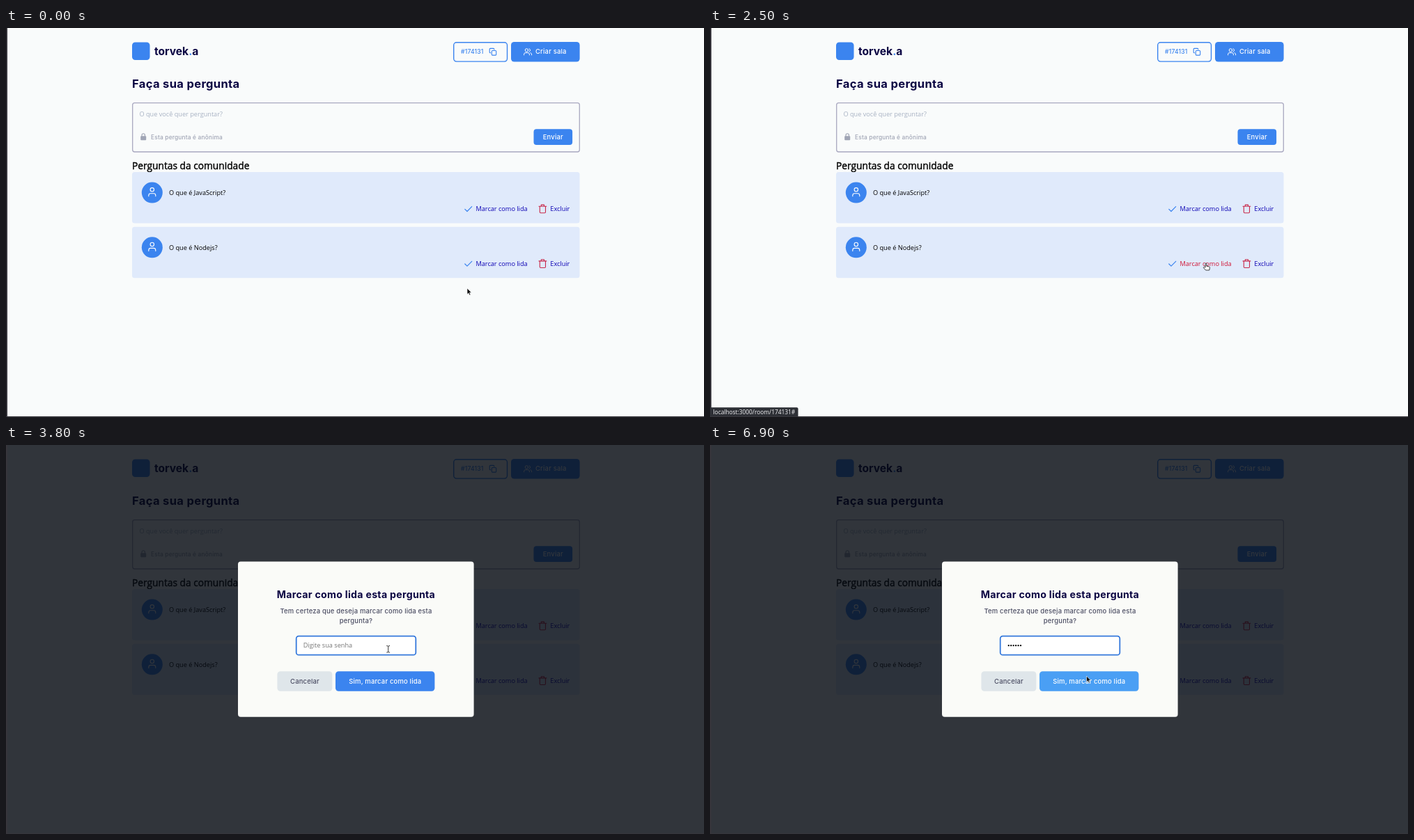
Recreate the animation shown at these times as an HTML page. Size 1002 px wide and 559 px high, loop 8 s.

```html
<!DOCTYPE html>
<html lang="pt-BR">
<head>
<meta charset="utf-8">
<title>Perguntas</title>
<style>
  html, body { margin: 0; width: 100%; height: 100%; overflow: hidden; background: #f9fbfb; }
  svg { display: block; width: 1002px; height: 559px; }
  text { font: 9.16px "Open Sans", "Noto Sans", sans-serif; }
  .ui { font: 500 9.45px Inter, sans-serif; letter-spacing: .02em; }
  .title { font: 700 16.55px Inter, sans-serif; letter-spacing: .02em; fill: #0b0543; }
  .mid { text-anchor: middle; }
  .blue { fill: #3b84ef; }
  .line { fill: none; stroke-linecap: round; stroke-linejoin: round; }
</style>
</head>
<body>
<svg viewBox="0 0 1002 559">
  <defs>
    <g id="card">
      <rect x="181" y="207" width="642.5" height="73.5" rx="3.5" fill="#e0eafb"/>
      <circle class="blue" cx="209.8" cy="236.6" r="15"/>
      <g class="line" stroke="#fff" stroke-width="1.1">
        <circle cx="209.8" cy="232.3" r="2.7"/>
        <path d="M204.8 241.7v-1.2a2.8 2.8 0 0 1 2.8-2.8h4.4a2.8 2.8 0 0 1 2.8 2.8v1.2"/>
      </g>
      <path class="line" stroke="#3b84ef" stroke-width="1.2" d="M658.8 260.3l3.2 3.2 6.7-6.9"/>
      <text x="674.5" y="263.3" fill="currentColor">Marcar como lida</text>
      <path class="line" stroke="#c8284a" stroke-width="1.1"
        d="M765 256.2h10.8M768.3 256v-1.9h4.2v1.9M766.3 256.4v8.2a1.2 1.2 0 0 0 1.2 1.2h5.8a1.2 1.2 0 0 0 1.2-1.2v-8.2"/>
      <text x="781.3" y="263.3" fill="#0b00b4">Excluir</text>
    </g>
  </defs>

  <rect width="1002" height="559" fill="#f9fbfb"/>
  <rect class="blue" x="181" y="20.5" width="25.5" height="25.5" rx="4.5"/>
  <text class="title" x="213" y="38.6" style="font-size:15.6px;letter-spacing:0">torvek<tspan class="blue">.</tspan>a</text>

  <rect x="642.7" y="20.7" width="76.8" height="27.4" rx="4" fill="none" stroke="#3b84ef" stroke-width="1.4"/>
  <text class="ui blue" x="653" y="37.3" style="font-size:8.6px">#174131</text>
  <g class="line" stroke="#3b84ef" stroke-width="1.1">
    <rect x="697.3" y="32.5" width="6.4" height="6.6" rx="1"/>
    <path d="M695.8 35.8h-.6a1 1 0 0 1-1-1v-4.4a1 1 0 0 1 1-1h4.6a1 1 0 0 1 1 1v.6"/>
  </g>
  <rect class="blue" x="725" y="20" width="98.6" height="28.6" rx="4.5"/>
  <g class="line" stroke="#fff" stroke-width="1">
    <circle cx="747.4" cy="31.9" r="2.2"/>
    <path d="M743.6 38.8v-1a2.2 2.2 0 0 1 2.2-2.2h3.4a2.2 2.2 0 0 1 2.2 2.2v1M751 29.8a2.2 2.2 0 0 1 0 4.2M754.6 38.8v-1a2.2 2.2 0 0 0-1.7-2.1"/>
  </g>
  <text class="ui" x="760" y="37.3" fill="#fff">Criar sala</text>

  <text class="title" x="181" y="86">Faça sua pergunta</text>
  <rect x="181.7" y="107.6" width="641.6" height="70.4" rx="3" fill="none" stroke="#a9a8c0" stroke-width="1.3"/>
  <text x="191.5" y="127.1" fill="#a8b2c3">O que você quer perguntar?</text>
  <g fill="#a0a5b5">
    <rect x="193.2" y="155.2" width="8" height="6" rx="1"/>
    <path class="line" stroke="#a0a5b5" stroke-width="1.1" d="M195 155.4v-1.4a2.2 2.2 0 0 1 4.4 0v1.4"/>
    <text class="ui" x="208" y="159.6" style="font-size:8.4px">Esta pergunta é anônima</text>
  </g>
  <rect class="blue" x="757.5" y="145.2" width="55.6" height="22.8" rx="4"/>
  <text class="ui mid" x="785.3" y="159.7" fill="#fff">Enviar</text>

  <text x="181" y="202.5" stroke="#000" stroke-width=".4" style="font-size:13.75px">Perguntas da comunidade</text>
  <use href="#card" color="#0b00b4"/>
  <text x="234" y="240.2">O que é JavaScript?</text>
  <use id="second" href="#card" y="78.7"/>
  <text x="234" y="318.7">O que é Nodejs?</text>

  <g id="modal">
    <rect width="1002" height="559" fill="#060a12" opacity=".82"/>
    <rect x="333" y="167.5" width="338.6" height="223.3" rx="4" fill="#fafbf8"/>
    <text class="title mid" x="502.5" y="219.5" style="font-size:14.17px">Marcar como lida esta pergunta</text>
    <g class="mid" fill="#4b4d63">
      <text class="ui" x="502.5" y="241.7">Tem certeza que deseja marcar como lida esta</text>
      <text class="ui" x="502.5" y="256.1">pergunta?</text>
    </g>
    <rect x="416.7" y="274.7" width="171.6" height="27" rx="3.5" fill="#fff" stroke="#3579dc" stroke-width="1.8"/>
    <text id="hint" x="426.8" y="291.3" fill="#757575">Digite sua senha</text>
    <g id="dots"></g>
    <rect id="caret" y="282" width=".9" height="12.6"/>
    <rect x="389.4" y="325.2" width="79" height="28.6" rx="4.5" fill="#dfe6ea"/>
    <text class="ui mid" x="429" y="342.7" fill="#4b4d63">Cancelar</text>
    <rect id="confirm" x="473" y="325.2" width="142.4" height="28.6" rx="4.5"/>
    <text class="ui mid" x="544.3" y="342.7" fill="#fff">Sim, marcar como lida</text>
  </g>

  <path d="M0 0H2V558H1002V559H0Z" fill="#37363c"/>
  <g id="status">
    <path d="M0 545.2H124.5a2 2 0 0 1 2 2V558H0Z" fill="#2e3036"/>
    <text x="4.5" y="554.6" fill="#f4f4f6" style="font-size:8.37px">localhost:3000/room/174131#</text>
  </g>

  <g id="cursor" stroke-linejoin="round">
    <path id="arrow" d="M0 0V8.7L2 6.9 3.4 10 4.9 9.3 3.5 6.3H6.2Z" fill="#111" stroke="#fff" stroke-width=".6"/>
    <path id="hand" fill="#fff" stroke="#111" stroke-width=".8"
      d="M-.9 6V1A.9.9 0 0 1 .9 1V4.2L4.6 5Q5.6 5.3 5.5 6.4L4.8 10H-.4L-3.6 6.5Q-3.6 5.3-2.4 5.6Z"/>
    <path id="beam" class="line" stroke="#222" stroke-width=".9" d="M-2-4.8Q0-4.8 0-3.8Q0-4.8 2-4.8M0-3.8V3.8M-2 4.8Q0 4.8 0 3.8Q0 4.8 2 4.8"/>
  </g>
</svg>
<script>
  const LOOP = 8000, STEP = 100;
  const $ = id => document.getElementById(id);
  const show = (id, on) => $(id).setAttribute('visibility', on ? 'inherit' : 'hidden');
  const within = (t, a, b) => t >= a && t < b;

  // Pointer path: time, x, y
  const path = [
    [700, 662, 374], [1000, 655, 352], [1300, 664, 325], [1600, 700, 336],
    [1800, 690, 330], [2000, 677.5, 347.5], [2500, 712, 338], [3200, 712, 338],
    [3800, 548.7, 293.3], [6000, 548.7, 293.3], [6300, 542, 314.5], [6500, 540.5, 332]
  ];
  const keyTimes = [4600, 4800, 5100, 5300, 5600, 5800];
  const PITCH = 3.45, FIELD_X = 427;

  $('dots').innerHTML = keyTimes.map((_, i) =>
    `<circle cx="${FIELD_X + PITCH * (i + .5)}" cy="288.2" r="1.15"/>`).join('');

  function pointer(t) {
    const i = path.findIndex(p => p[0] >= t);
    if (i < 0) return path.at(-1).slice(1);
    if (i === 0) return path[0].slice(1);
    const [t0, x0, y0] = path[i - 1], [t1, x1, y1] = path[i];
    const k = (t - t0) / (t1 - t0);
    return [x0 + (x1 - x0) * k, y0 + (y1 - y0) * k];
  }

  function draw(t) {
    const [x, y] = pointer(t);
    const over = (l, top, r, b) => x >= l && x <= r && y >= top && y <= b;
    const open = t >= 3000;
    const onConfirm = open && over(473, 325, 615.5, 354);
    const onField = open && over(416, 274, 589, 302);
    const onLink = !open && over(658, 331, 749, 350);
    const pressed = within(t, 2800, 3300) || t >= 6900;
    const kind = onField ? 'beam' : (onLink || onConfirm) && !pressed ? 'hand' : 'arrow';
    for (const id of ['arrow', 'hand', 'beam']) show(id, id === kind);
    $('cursor').setAttribute('transform', `translate(${x} ${y})`);

    $('second').setAttribute('color', !open && over(675, 331, 749, 346) ? '#cf1233' : '#0b00b4');
    $('confirm').setAttribute('fill', onConfirm ? '#4a9ff4' : '#3b84ef');
    show('modal', open);
    show('status', within(t, 2500, 3500));

    const typed = keyTimes.filter(k => t >= k).length;
    [...$('dots').children].forEach((dot, i) => dot.setAttribute('opacity', i < typed ? 1 : 0));
    show('hint', !typed);
    $('caret').setAttribute('x', FIELD_X + PITCH * typed);
    show('caret', within(t, 3300, 3800) || within(t, 4400, 6400));
  }

  function frame(now) {
    draw(Math.floor(now % LOOP / STEP) * STEP);
    requestAnimationFrame(frame);
  }
  requestAnimationFrame(frame);
</script>
</body>
</html>
```
